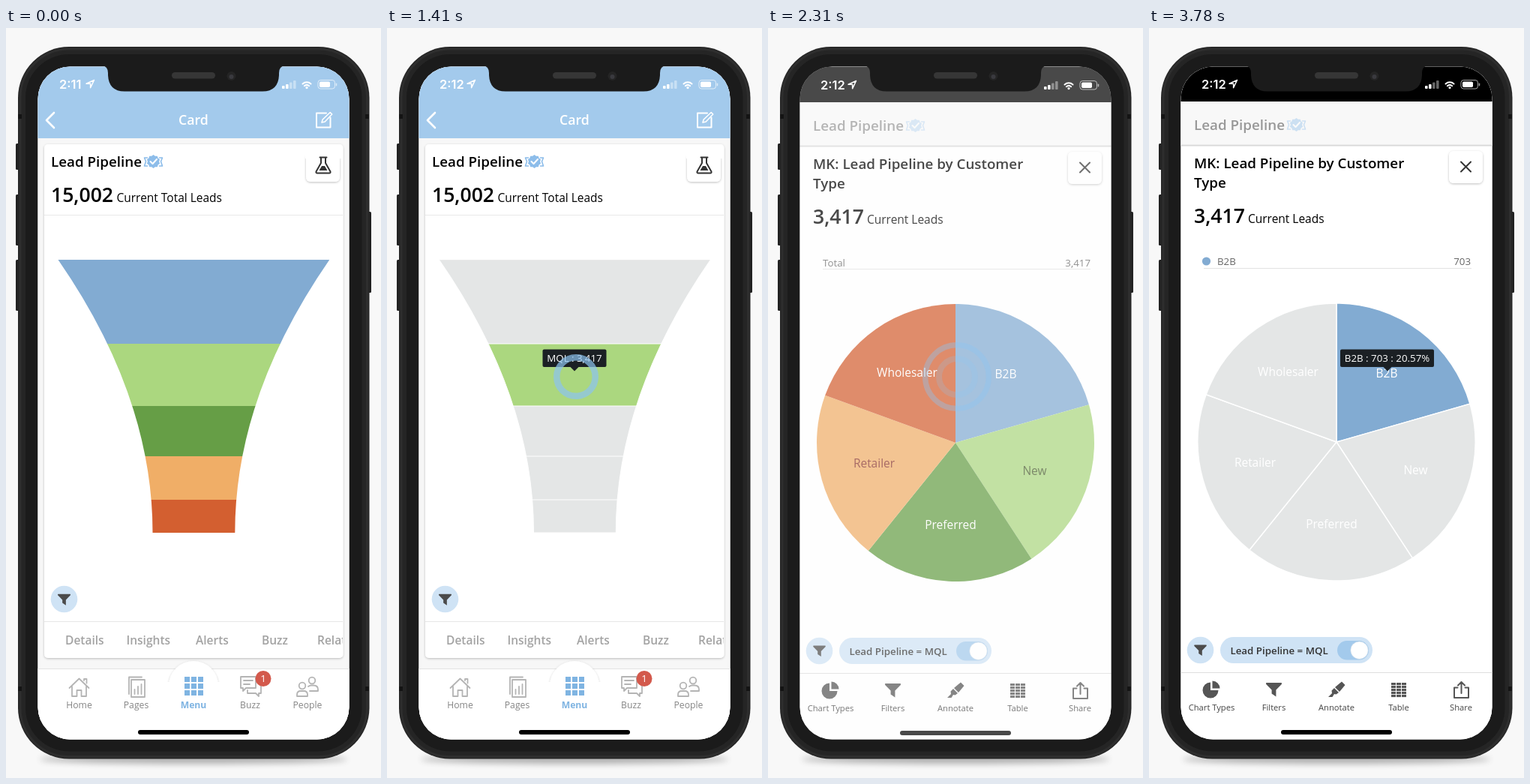
Animation, 500 px wide and 1000 px high, one loop 4.2 s. Source, as an HTML page:

```html
<!DOCTYPE html>
<html lang="en">
<head>
<meta charset="utf-8">
<style>
html, body { margin: 0; width: 100%; height: 100%; overflow: hidden; background: #f8f8f8; }
svg { display: block; width: 100vw; height: 100vh; }
text { font-family: "Open Sans", "Noto Sans", sans-serif; font-size: 15.5px; }
.clock { font: 600 16.5px Inter, "Liberation Sans", sans-serif; fill: #fff; }
.head { font-size: 17.7px; font-weight: 600; }
.title { font-size: 18.8px; font-weight: 600; }
.big { font-size: 26.6px; font-weight: 600; }
.tab { font-weight: 600; fill: #a3a3a3; }
.nav { font-size: 12.2px; font-weight: 500; fill: #858585; }
.on { fill: #7fb4e2; font-weight: 700; }
.tool { font-size: 11.2px; fill: #444; }
.small { font-size: 13.3px; }
.chip { font-weight: 600; }
.mid { text-anchor: middle; }
.end { text-anchor: end; }
.line { fill: none; stroke-linecap: round; stroke-linejoin: round; }
</style>
</head>
<body>
<svg id="stage" viewBox="0 0 500 1000"></svg>
<script>
const BLUE = '#82abd2', LIME = '#abd77f', GREEN = '#669e46', ORANGE = '#f0ae67', RED = '#d35f30';
const GREY = '#e4e6e6', SKY = '#a3caec', PALE = '#cfe3f5';

const text = (x, y, s, cls = '', fill = '') =>
  `<text x="${x}" y="${y}" class="${cls}"${fill && ` fill="${fill}"`}>${s}</text>`;
const rect = (x, y, w, h, fill, r = 0, more = '') =>
  `<rect x="${x}" y="${y}" width="${w}" height="${h}" rx="${r}" fill="${fill}" ${more}/>`;
const circle = (x, y, r, fill, more = '') => `<circle cx="${x}" cy="${y}" r="${r}" fill="${fill}" ${more}/>`;
const fillPath = (d, fill, more = '') => `<path d="${d}" fill="${fill}" ${more}/>`;
const line = (d, color, w = 1) => `<path class="line" d="${d}" stroke="${color}" stroke-width="${w}"/>`;
const group = (id, body) => `<g id="${id}">${body}</g>`;
const labels = (list, cls, y) => list.map(([x, s]) => text(x, y, s, cls)).join('');
const SOFT = 'filter="url(#soft)"';

const funnelIcon = (x, y, s, color) =>
  fillPath('M-9 -8H9Q10 -7 9 -6L2.6 .5V8.5L-2.6 5V.5L-9 -6Q-10 -7 -9 -8Z', color, `transform="translate(${x} ${y}) scale(${s})"`);

function badge(x, y) {
  let d = '';
  for (let i = 0; i < 20; i++) {
    const a = i * Math.PI / 10, r = i % 2 ? 7.6 : 9;
    d += (i ? 'L' : 'M') + (x + r * Math.sin(a)) + ' ' + (y - r * Math.cos(a));
  }
  return line(`M${x - 8} ${y - 5}h-4l2 5-2 6h4M${x + 8} ${y - 5}h4l-2 5 2 6h-4`, '#8dbdea', 1.6) +
    fillPath(d + 'Z', '#8dbdea') + line(`M${x - 4} ${y}l3 3 5.5-6`, '#fff', 2);
}

function status() {
  const bars = [4, 6, 8.5, 11].map((h, i) =>
    rect(368 + 5 * i, 81 - h, 3.6, h, '#fff', 1, i > 1 ? 'opacity=".4"' : '')).join('');
  return bars + line('M117.5 69.5L107 74.2h5.6v5.6z', '#fff', 1.5) +
    line('M395.5 74.5a8 8 0 0 1 11 0M397.8 77.2a5 5 0 0 1 6.4 0', '#fff', 2) + circle(401, 79.6, 1.6, '#fff') +
    rect(416, 69.5, 22.5, 11.5, 'none', 3.4, 'stroke="#fff" stroke-opacity=".65"') +
    rect(418, 71.5, 14, 7.5, '#fff', 1.8) + rect(439.8, 73.5, 1.4, 4, '#fff', .7, 'opacity=".65"');
}

const tip = (x, y, w, tail, label) => rect(x, y, w, 23.5, '#1b2024', 2) +
  fillPath(`M${tail - 6} ${y + 23}h12l-6 6z`, '#1b2024') + text(x + w / 2, y + 16.5, label, 'small mid', '#fff');

const homeBar = rect(176, 936, 148, 6, '#000', 3);

// Funnel screen
const cuts = [309, 421, 504, 571, 629, 673];
const funnelShape = 'M69.5 309Q195.5 491 195.5 673H305.3Q305.3 491 431.3 309Z';
const bands = colors => '<g clip-path="url(#funnel)">' +
  colors.map((c, i) => rect(60, cuts[i], 380, cuts[i + 1] - cuts[i], c)).join('') + '</g>';

function navIcons() {
  const c = '#b4b4b4', w = 1.8, head = `stroke="${c}" stroke-width="${w}"`;
  let grid = '';
  for (let i = 0; i < 9; i++) grid += rect(238 + i % 3 * 9, 865 + (i / 3 | 0) * 9, 7, 7, '#7fb4e2');
  return line('M84.5 880l13-12.5 13 12.5M88 878v13h6.5v-8h6v8h6.5v-13M104 870v-2h3.5v5.5', c, w) +
    line('M167 869h18v23h-18zM164 888v-22.5h17M171.5 888v-6M176 888v-10M180.5 888v-13', c, w) + grid +
    line('M313 865h20v15h-13l-4 4v-4h-3zM317 870h12M317 875h8M337 874h3v13h-3v4l-4-4h-11v-4', c, w) +
    circle(343, 867.5, 10.5, '#d3594c') + text(343, 872, '1', 'small mid', '#fff') +
    circle(408, 870, 4.3, 'none', head) + circle(395, 877, 4.3, 'none', head) +
    line('M388 891v-2q0-5 5-5h4q5 0 5 5v2zM403 878q2-1.5 4-1.5h3q6 0 6 5.5v2h-11', c, w);
}

const leads =
  rect(42, 51, 416, 898, '#f7f7f7') + rect(42, 51, 416, 96, SKY) +
  group('clock1', text(71, 81, '2:11', 'clock')) + group('clock2', text(70, 81, '2:12', 'clock')) + status() +
  line('M64 113l-10 10 10 10', '#fff', 2.6) + text(250, 129, 'Card', 'head mid', '#fff') +
  line('M427 113.5h-13v19h18.5v-13', '#fff', 2) + line('M421 126l1.2-4 10-9.5 2.5 2.5-9.5 10z', '#fff', 1.6) +
  rect(51, 155, 398.5, 685, '#fff', 5, SOFT) +
  text(60, 185, 'Lead Pipeline', 'title') + badge(196.5, 178) +
  text(60, 232, '15,002', 'big') + text(147.5, 232, 'Current Total Leads') +
  rect(400, 168, 45, 37, '#fff', 6, SOFT) + rect(399, 162, 48, 12, '#fff') +
  line('M418.5 172.5h9M420 173v7l-6.5 11.5q-.5 2 1.5 2h16q2 0 1.5-2l-6.5-11.5v-7', '#333', 2) +
  fillPath('M417.5 190l3.5-6h4l3.5 6z', '#333') +
  rect(51, 249, 398, 1, '#e9e9e9') + rect(51, 791, 398, 1, '#e6e6e6') +
  group('colors', bands([BLUE, LIME, GREEN, ORANGE, RED])) +
  group('mql', bands([GREY, LIME, GREY, GREY, GREY]) + line(funnelShape, '#fff') +
    cuts.slice(1, 5).map(y => rect(60, y - .5, 380, 1, '#fff')).join('') +
    tip(207.5, 428.5, 85, 250, 'MQL : 3,417')) +
  circle(77.5, 761.5, 17.8, PALE) + funnelIcon(77.5, 762, .9, '#4b4b4b') +
  '<g clip-path="url(#card)">' +
  labels([[79, 'Details'], [160.5, 'Insights'], [253, 'Alerts'], [341, 'Buzz'], [415, 'Related']], 'tab', 822) + '</g>' +
  rect(42, 854, 416, 95, '#fff') + rect(42, 854, 416, 1, '#e4e4e4') +
  circle(250, 877, 33, '#fff', SOFT) + rect(210, 872, 80, 42, '#fff') +
  navIcons() + labels([[97.5, 'Home'], [173.5, 'Pages'], [325.5, 'Buzz'], [402, 'People']], 'nav mid', 906.5) +
  text(250, 906.5, 'Menu', 'nav mid on') + homeBar;

// Pie screen
const slices = [
  ['B2B', 74.05, BLUE, 317, 466, '#fff'],
  ['New', 146.8, LIME, 355.5, 595, '#48592f'],
  ['Preferred', 218.9, GREEN, 243.5, 667, '#fff'],
  ['Retailer', 290, ORANGE, 141.5, 585, '#86312a'],
  ['Wholesaler', 360, RED, 185.5, 464, '#fff']
];
const rim = deg => {
  const a = deg * Math.PI / 180;
  return (250 + 185 * Math.sin(a)).toFixed(2) + ' ' + (552 - 185 * Math.cos(a)).toFixed(2);
};
const pie = picked => slices.map(([, end, color], i) =>
  fillPath(`M250 552L${rim(i ? slices[i - 1][1] : 0)}A185 185 0 0 1 ${rim(end)}Z`,
    picked && i ? GREY : color, picked ? 'stroke="#fff" stroke-width="1.4"' : '')).join('') +
  slices.map(([name, , , x, y, c]) => text(x, y, name, 'mid', picked ? '#fff' : c)).join('');

function toolIcons() {
  const c = '#555';
  let table = '';
  for (let i = 0; i < 15; i++) table += rect(323 + i % 3 * 7, 873 + (i / 3 | 0) * 4, 6, 3.1, c);
  return fillPath('M82 872.5a10.5 10.5 0 1 0 10.5 10.5h-10.5z', c) +
    fillPath('M84.5 870.5a10 10 0 0 1 10 10h-10z', c) + funnelIcon(166.5, 882, 1.12, c) +
    fillPath('M248 879l9-7.5 4.5 4.5-7.5 9zM247 880l6 6-3.5 2.5-2.5-.5-2.5 4h-5.5l5-5-.5-3.500z', c) + table +
    line('M411.5 879.5h-4.5v13.5h19v-13.5h-4.5M416.5 887v-14.5M412 876.5l4.5-4.5 4.5 4.5', c, 2);
}

const detail =
  rect(42, 51, 416, 898, '#fff') + rect(42, 51, 416, 47, '#000') + text(70, 81, '2:12', 'clock') + status() +
  rect(42, 98, 416, 59, '#f8f8f8') + text(60, 136, 'Lead Pipeline', 'title', '#989898') +
  `<g opacity=".4">${badge(196.5, 129)}</g>` +
  rect(42, 155, 416, 1, '#ececec') + rect(42, 156, 416, 1.5, '#d8d8d8') +
  text(60, 187, 'MK: Lead Pipeline by Customer', 'title') + text(60, 213, 'Type', 'title') +
  rect(400, 164, 45, 43, '#fff', 6, SOFT) + line('M416 178.5l13 13M429 178.5l-13 13', '#333', 2) +
  text(60, 260, '3,417', 'big') + text(132, 260, 'Current Leads') +
  rect(73, 320, 357, 1, '#e2e2e2') +
  group('total', text(73, 316.5, 'Total', 'small', '#666') + text(430, 316.5, '3,417', 'small end', '#666')) +
  group('slices', pie(false)) +
  group('b2b', circle(76.5, 311, 5.6, BLUE) + text(91, 315.5, 'B2B', 'small', '#666') +
    text(429, 315.5, '703', 'small end', '#666') + pie(true) +
    tip(255, 428.5, 125, 318, 'B2B : 703 : 20.57%')) +
  circle(68.5, 829.5, 17.8, PALE) + funnelIcon(68.5, 829.5, .88, '#4b4b4b') +
  rect(95, 812, 203, 35, PALE, 17.5) + text(108.5, 834.5, 'Lead Pipeline = MQL', 'small chip', '#333') +
  rect(251, 817, 42, 25.5, SKY, 12.7) + circle(280.5, 829.7, 11.8, '#fff', 'stroke="#b9cfe2" stroke-width=".6"') +
  rect(42, 859, 416, 1, '#dedede') + toolIcons() +
  labels([[83.5, 'Chart Types'], [166.5, 'Filters'], [250, 'Annotate'], [333, 'Table'], [416, 'Share']], 'tool mid', 909.5) + homeBar;

// Phone
const phone =
  '<ellipse cx="250" cy="975" rx="205" ry="6" opacity=".3" filter="url(#blur)"/>' +
  [[13, 154, 35], [13, 222, 68], [13, 309, 68], [482, 245, 108]].map(([x, y, h]) => rect(x, y, 5, h, '#222', 1.5)).join('') +
  rect(16, 25, 468.5, 949.5, '#252525', 68) + rect(19, 28, 462.5, 943.5, 'none', 65, 'stroke="#2e2e2e" stroke-width="3"') +
  rect(26, 35, 448.5, 929.5, '#1b1b1b', 58) +
  [[16, 115], [479, 115], [16, 878], [479, 878]].map(([x, y]) => rect(x, y, 5, 6, '#141414')).join('');
const notch =
  fillPath('M128 50Q136 51 136 60V63Q137 84.5 158 84.5H342Q363 84.5 364 63V60Q364 51 372 50Z', '#1b1b1b') +
  rect(221, 59, 58, 8.5, '#363636', 4.2) + circle(300.5, 64, 6, '#252525') + circle(300.5, 65, 3, '#3a3a3f');

document.getElementById('stage').innerHTML = `<defs>
  <clipPath id="screen"><rect x="42.5" y="51.5" width="415" height="897" rx="43"/></clipPath>
  <clipPath id="card"><rect x="51" y="155" width="398" height="685"/></clipPath>
  <clipPath id="funnel"><path d="${funnelShape}"/></clipPath>
  <filter id="soft" x="-20%" y="-20%" width="140%" height="140%"><feDropShadow dx="0" dy="1" stdDeviation="1.8" flood-opacity=".25"/></filter>
  <filter id="blur" x="-10%" y="-150%" width="120%" height="400%"><feGaussianBlur stdDeviation="4"/></filter>
  </defs>` + phone +
  `<g clip-path="url(#screen)">${rect(42, 51, 416, 898, '#fcfcfc')}${group('leads', leads)}${group('detail', detail)}</g>` + notch +
  '<g fill="none" stroke="#8cc3ef"><circle id="ring"/><circle id="core"/></g>';

const $ = id => document.getElementById(id);
const ramp = (t, a, b) => Math.min(1, Math.max(0, (t - a) / (b - a)));
const mix = (a, b, p) => a + (b - a) * p;
const smooth = p => p * p * (3 - 2 * p);
const fade = (id, o) => {
  $(id).setAttribute('opacity', o);
  $(id).style.display = o > 0 ? '' : 'none';
};

function setRing(id, x, y, outer, width, opacity) {
  const attrs = { cx: x, cy: y, r: outer - width / 2, 'stroke-width': width };
  for (const k in attrs) $(id).setAttribute(k, attrs[k]);
  fade(id, opacity);
}

function draw(now) {
  const t = Math.floor(now % 4200 / 30) * 30;

  const pick = ramp(t, 1080, 1320);
  fade('mql', pick);
  fade('colors', pick < 1 ? 1 : 0);
  fade('clock1', 1 - pick);
  fade('clock2', pick);
  fade('leads', 1 - ramp(t, 1860, 2070));

  const enter = ramp(t, 2088, 2400);
  fade('detail', enter);
  $('detail').setAttribute('transform', `translate(0 ${20 * (1 - enter) ** 2.4})`);

  const select = ramp(t, 2670, 2940);
  fade('b2b', select);
  fade('slices', select < 1 ? 1 : 0);
  fade('total', 1 - select);

  // Touch ring: glide in, press, then ripple away
  const glide = smooth(ramp(t, 810, 1290)), press = ramp(t, 1890, 2160), ripple = ramp(t, 2190, 2430);
  const x = mix(451.5, 252, glide), y = mix(505, 465, glide);
  const shown = t < 810 ? 0 : mix(.7, .8, press) * ramp(t, 780, 930);
  setRing('ring', x, y, mix(mix(30, 34, press), 58, ripple), mix(mix(8.5, 13.5, press), 1, ripple), shown * (1 - ripple));
  setRing('core', x, y, 28, 8, ripple ? .45 * (1 - ripple) : 0);

  requestAnimationFrame(draw);
}
draw(0);
</script>
</body>
</html>
```
